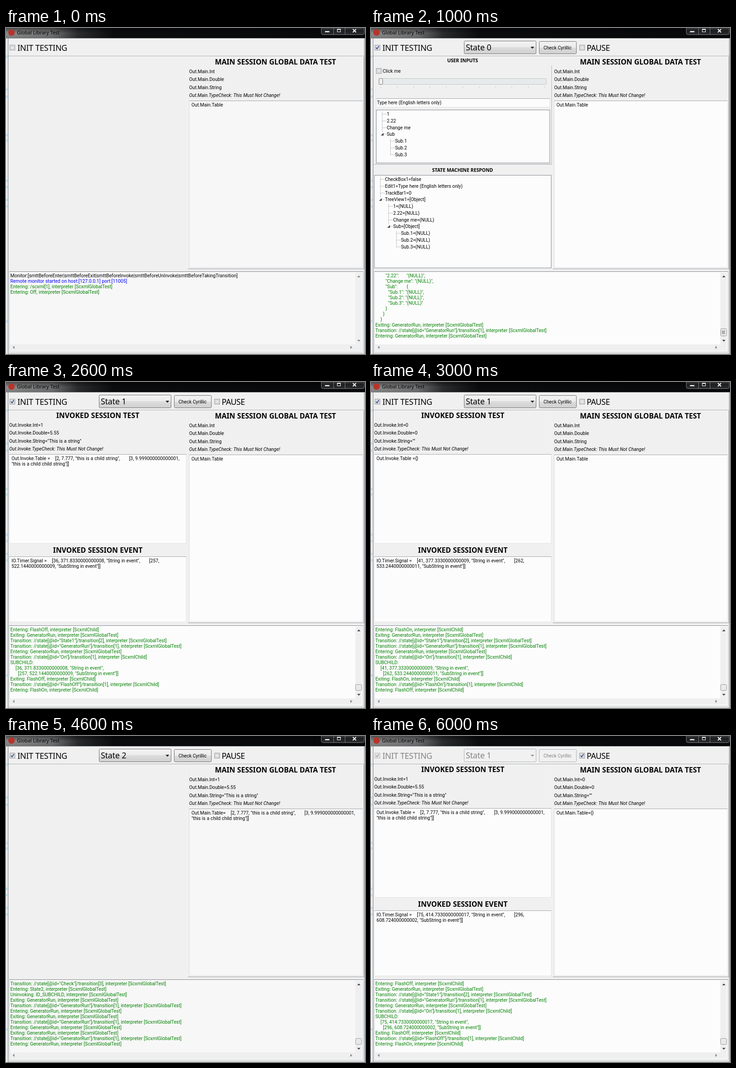
Write an HTML page that moves like this. It is 784x714 px and loops after 7000 ms.

```html
<!DOCTYPE html>
<html lang="en">
<head>
<meta charset="utf-8">
<title>Global Library Test</title>
<style>
html, body { margin: 0; width: 100%; height: 100%; overflow: hidden; background: #f0f0f0; }
svg { display: block; width: 784px; height: 714px; }
text { white-space: pre; font: 10.25px Roboto, sans-serif; word-spacing: .25px; }
.h1 { font: bold 15.6px "Noto Sans", sans-serif; text-anchor: middle; }
.h2 { font: bold 10.3px "Noto Sans", sans-serif; text-anchor: middle; }
.big { font: 17.6px "Noto Sans", sans-serif; letter-spacing: -.2px; }
.ui { font: 10.6px "Noto Sans", sans-serif; }
.it { font-style: italic; }
.mid { text-anchor: middle; }
</style>
</head>
<body>
<svg id="stage" viewBox="0 0 784 714">
<defs>
  <linearGradient id="bar"><stop offset="0" stop-color="#8b8b8b"/><stop offset=".13" stop-color="#6f7072"/><stop offset=".2" stop-color="#2b2c2e"/><stop offset=".3" stop-color="#0b0c0e"/><stop offset="1" stop-color="#08090b"/></linearGradient>
  <linearGradient id="shade" x2="0" y2="1"><stop offset="0" stop-color="#000" stop-opacity=".45"/><stop offset=".5" stop-color="#000" stop-opacity="0"/><stop offset="1" stop-color="#000" stop-opacity=".1"/></linearGradient>
  <linearGradient id="btn" x2="0" y2="1"><stop offset="0" stop-color="#f3f3f3"/><stop offset=".5" stop-color="#ebebeb"/><stop offset=".5" stop-color="#dddddd"/><stop offset="1" stop-color="#cfcfcf"/></linearGradient>
  <linearGradient id="glass"><stop offset="0" stop-color="#f2f4f5"/><stop offset=".5" stop-color="#e4f3f5"/><stop offset="1" stop-color="#f6f7f7"/></linearGradient>
  <linearGradient id="cap" x2="0" y2="1"><stop offset="0" stop-color="#4a4b4d"/><stop offset=".5" stop-color="#1d1e20"/><stop offset="1" stop-color="#2c2d2f"/></linearGradient>
</defs>
</svg>
<script>
const NS = 'http://www.w3.org/2000/svg';
const stage = document.getElementById('stage');
const INK = '#000', GREEN = '#008000', BLUE = '#0000ff', DIM = '#838383';
let layer = stage;

function add(tag, attrs, body) {
  const el = document.createElementNS(NS, tag);
  for (const k in attrs) el.setAttribute(k, attrs[k]);
  if (body !== undefined) el.textContent = body;
  return layer.appendChild(el);
}
const text = (x, y, s, cls = '', fill = INK) => add('text', { x, y, class: cls, fill }, s);
const rect = (x, y, width, height, fill) => add('rect', { x, y, width, height, fill });
// Pixel-aligned outlined box
const box = (x, y, w, h, fill, stroke, rx = 0) =>
  add('rect', { x: x + .5, y: y + .5, width: w - 1, height: h - 1, fill, stroke, rx });
const path = (d, fill, stroke = 'none', w = 1) => add('path', { d, fill, stroke, 'stroke-width': w });
const dots = (x1, y1, x2, y2) =>
  add('line', { x1, y1, x2, y2, stroke: '#8c8c8c', 'stroke-dasharray': '1 1' });

function panel(x, y, w, h, fill) {
  box(x, y, w, h, fill, '#e2e3e6');
  rect(x, y, w, 1, '#a2a5aa');
}

function checkbox(x, y, on, dim) {
  box(x, y, 12, 12, '#f4f4f4', dim ? '#b1b1b1' : '#8e8f8f');
  box(x + 2, y + 2, 8, 8, '#e6e8ea', dim ? '#dcdcdc' : '#c0c4c8');
  if (on) path(`M${x + 3} ${y + 5.5}l2.2 3.2 4-6.2`, 'none', dim ? '#a5a5a5' : '#33488c', 1.7);
}

function frame() {
  rect(0, 0, 784, 714, '#f0f0f0');
  rect(0, 0, 784, 23, 'url(#bar)');
  rect(0, 0, 784, 23, 'url(#shade)');
  add('circle', { cx: 12, cy: 10, r: 7, fill: '#b8342a' });
  text(24, 14, 'Global Library Test', 'ui');
  box(688, -4, 95, 19, 'url(#cap)', '#7c7d80', 4);
  rect(715, 0, 1, 14, '#7c7d80');
  rect(740, 0, 1, 14, '#7c7d80');
  box(696, 6, 11, 4, '#fff', '#555');
  box(723, 3, 8, 6, 'none', '#fff');
  rect(723, 2, 8, 2, '#fff');
  path('M757.5 2.5l7 7m0-7l-7 7', 'none', '#fff', 2);
  rect(0, 22, 784, 1, '#8f9294');
  rect(0, 23, 4, 691, '#eef2f4');
  for (const y of [60, 132, 148, 232, 244, 332, 346, 374, 388, 640]) rect(0, y, 3, 5, '#bfe3f2');
  rect(4, 23, 1, 691, '#6d7073');
  rect(782, 23, 1, 691, '#7a7d80');
  rect(783, 23, 1, 691, '#e4e8ea');
  rect(5, 61, 777, 1, '#a3a3a3');
  rect(5, 62, 777, 1, '#fff');
  rect(5, 712, 777, 1, '#b4b6b8');
}

function toolbar({ state, pause, focus }) {
  const on = state !== undefined, ink = pause ? DIM : INK;
  checkbox(8, 37, on, pause);
  text(25, 50, 'INIT TESTING', 'big', ink);
  if (!on) return;
  const edge = pause ? '#adb2b5' : '#707070', face = pause ? '#f1f1f1' : 'url(#btn)';
  box(203, 28, 158, 29, face, edge, 2);
  text(207, 49, 'State ' + state, 'big', ink);
  path('M348.5 41h8l-4 4.5z', pause ? '#9a9a9a' : '#222');
  box(367, 29, 82, 28, face, focus ? '#3c7fb1' : edge, 2);
  if (focus) box(368, 30, 80, 26, 'none', '#5fcbf0', 1);
  text(407.5, 47, 'Check Cyrillic', 'mid', ink);
  checkbox(455, 37, pause);
  text(471, 50, 'PAUSE', 'big').style.letterSpacing = '-.6px';
}

function mainSession({ paper, main = ['', '', '', ['']] }) {
  const [int, dbl, str, table] = main;
  rect(396, 63, 1, 465, '#fafafa');
  rect(397, 63, 1, 465, '#e4e4e4');
  rect(397, 527, 385, 1, '#9c9c9c');
  rect(781, 63, 1, 465, '#a8a8a8');
  text(588.5, 80, 'MAIN SESSION GLOBAL DATA TEST', 'h1');
  text(400, 99, 'Out.Main.Int' + int);
  text(400, 116, 'Out.Main.Double' + dbl);
  text(400, 134, 'Out.Main.String' + str);
  text(400, 151, 'Out.Main.TypeCheck: This Must Not Change!', 'it');
  panel(400, 159, 379, 366, paper);
  text(405, 172, 'Out.Main.Table' + table[0]);
  if (table[1]) text(405, 184, table[1]);
}

function invoked({ paper, invoke: [int, dbl, str, table], event }) {
  text(200.5, 79, 'INVOKED SESSION TEST', 'h1');
  text(7, 98, 'Out.Invoke.Int=' + int);
  text(7, 115, 'Out.Invoke.Double=' + dbl);
  text(7, 133, `Out.Invoke.String="${str}"`);
  text(7, 150, 'Out.Invoke.TypeCheck: This Must Not Change!', 'it');
  panel(7, 158, 387, 196, paper);
  text(12, 171, 'Out.Invoke.Table =' + table[0]);
  if (table[1]) text(12, 183, table[1]);
  text(200.5, 374, 'INVOKED SESSION EVENT', 'h1');
  panel(7, 382, 387, 144, paper);
  const [a, b, c, d] = event;
  text(12, 395, `IO.Timer.Signal =    [${a}, ${b}, "String in event",       [${c},`);
  text(12, 407, `${d}, "SubString in event"]]`);
}

// Rows are [depth, label]; a parent row is one followed by a deeper row
function tree(x, y, rows) {
  const pitch = 14.75, step = 17.5, row = i => Math.round(y + i * pitch) + .5;
  rows.forEach(([depth, label], i) => {
    const lx = Math.round(x + depth * step) + .5, cy = row(i);
    let first = i;
    while (first && rows[first - 1][0] >= depth) first--;
    if (!rows.slice(i + 1).some(r => r[0] === depth)) dots(lx, row(first) - 5, lx, cy);
    dots(lx, cy, lx + 9, cy);
    if (rows[i + 1] && rows[i + 1][0] > depth) {
      rect(lx - 3, cy - 4, 7, 8, '#fcfcfc');
      path(`M${lx + 3} ${cy - 3}v6h-6z`, '#404040');
    }
    text(lx + 10, cy + 3.5, label);
  });
}

function inputs({ paper }) {
  text(200, 75, 'USER INPUTS', 'h2');
  rect(394, 82, 1, 217, '#b4b4b4');
  rect(7, 298, 388, 1, '#a0a0a0');
  checkbox(11, 88, false);
  text(25.5, 98, 'Click me');
  box(17, 110, 366, 14, '#e7eaea', '#c4c8c8');
  box(17, 110, 9, 14, '#f0f0f0', '#777', 2);
  for (let i = 0; i <= 10; i++) rect(Math.round(21 + i * 35.8), 128, 1, 3, '#c4c4c4');
  panel(11, 154, 380, 20, paper);
  text(13, 167, 'Type here (English letters only)');
  box(11, 179, 380, 117, paper, '#828790');
  const leaves = ['1', '2.22', 'Change me'], subs = ['Sub.1', 'Sub.2', 'Sub.3'];
  tree(24, 188, [...leaves.map(s => [0, s]), [0, 'Sub'], ...subs.map(s => [1, s])]);
  text(200, 315, 'STATE MACHINE RESPOND', 'h2');
  box(7, 322, 387, 204, paper, '#828790');
  const nil = depth => s => [depth, s + '=(NULL)'];
  tree(20, 331, [
    [0, 'CheckBox1=false'], [0, 'Edit1=Type here (English letters only)'], [0, 'TrackBar1=0'],
    [0, 'TreeView1=[Object]'], ...leaves.map(nil(1)), [1, 'Sub=[Object]'], ...subs.map(nil(2))
  ]);
}

function logView({ paper, log, thumb = 662 }) {
  box(7, 533, 773, 177, paper, '#c9ccd1');
  rect(7, 533, 773, 1, '#828790');
  rect(763, 536, 14, 157, '#efefef');
  rect(9, 693, 768, 14, '#efefef');
  const live = log.length > 4, ink = live ? '#444' : '#8a8a8a';
  path('M767 546h7l-3.5-4z', ink);
  path('M767 683h7l-3.5 4z', ink);
  path('M18.5 696v7l-4-3.5z', '#8a8a8a');
  path('M752 696v7l4-3.5z', '#8a8a8a');
  if (live) {
    box(763, thumb, 14, thumb < 660 ? 17 : 14, '#e9e9e9', '#979797', 2);
    if (thumb < 660) for (let i = 0; i < 4; i++) rect(766, thumb + 5 + i * 2, 7, 1, '#777');
  }
  log.forEach((line, i) => {
    const [s, fill] = [].concat(line);
    text(9.5, 546 + i * 12, s, '', fill || GREEN);
  });
}

function dialog() {
  box(187, 275, 348, 143, 'url(#glass)', '#62686c', 5);
  box(188, 276, 346, 141, 'none', '#fbfdfd', 4);
  text(194, 293, 'Globaltestlibrary', 'ui');
  path('M484.5 276v14q0 3.500 3.500 3.500h36q3.500 0 3.500-3.500v-14', '#f1f4f5', '#9ba1a5');
  path('M503.500 281.500l7 6.500m0-6.500l-7 6.500', 'none', '#555b60', 3.4);
  path('M503.500 281.500l7 6.500m0-6.500l-7 6.500', 'none', '#fff', 1.4);
  box(193, 302, 335, 109, '#fcfcfc', '#8a9094');
  rect(194, 373, 333, 37, '#f0f0f0');
  rect(194, 373, 333, 1, '#dfdfdf');
  text(203.5, 328, 'Cyrillic test SUCCEEDED!', 'ui').style.letterSpacing = '-.15px';
  text(203.5, 356, "P.S. Check also that modal window doesn't affect state machine!", 'ui').style.letterSpacing = '-.15px';
  box(456, 381, 61, 20, 'url(#btn)', '#3c7fb1', 2);
  box(457, 382, 59, 18, 'none', '#5fcbf0', 1);
  text(486.5, 395, 'OK', 'ui mid');
}

const G = 'ScxmlGlobalTest', C = 'ScxmlChild';
const by = who => `, interpreter [${who}]`;
const enter = (s, who = G) => `Entering: ${s}${by(who)}`;
const exit = (s, who = G) => `Exiting: ${s}${by(who)}`;
const move = (id, n, who = G, kind = 'state') =>
  `Transition: //${kind}[@id="${id}"]/transition[${n}]${by(who)}`;
const step = move('GeneratorRun', 1);
const cycle = [exit('GeneratorRun'), step, enter('GeneratorRun')];

function childLog(from, to, [a, b, c, d]) {
  return [
    enter(from, C), exit('GeneratorRun'), move('State1', 2), step, enter('GeneratorRun'),
    `Transition: //state[@id="On"]/transition[1]${by(C)}`, 'SUBCHILD:',
    `    [${a}, ${b}, "String in event",`, `      [${c}, ${d}, "SubString in event"]]`,
    exit(from, C), move(from, 1, C), enter(to, C)
  ];
}

const nested = ['    [2, 7.777, "this is a child string",       [3, 9.999000000000001,', '"this is a child child string"]]'];
const full = [1, 5.55, 'This is a string', nested], empty = [0, 0, '', ['{}']];
const mainFull = ['=1', '=5.55', '="This is a string"', ['=' + nested[0], nested[1]]];
const mainEmpty = ['=0', '=0', '=""', ['={}']];
const ev1 = [36, '371.8330000000008', 257, '522.1440000000009'];
const ev2 = [41, '377.3330000000009', 262, '533.2440000000011'];
const ev3 = [75, '414.7330000000017', 296, '608.724000000002'];
const WHITE = '#fcfcfc', PALE = '#f7f7f7';

const scenes = [
  { paper: PALE, log: [
    ['Monitor:[smttBeforeEnter|smttBeforeExit|smttBeforeInvoke|smttBeforeUnInvoke|smttBeforeTakingTransition]', INK],
    ['Remote monitor started on host:[127.0.0.1] port:[11005]', BLUE],
    enter('/scxml[1]'), enter('Off')] },
  { paper: WHITE, state: 0, left: inputs, thumb: 658, log: [
    '        "2.22":      "(NULL)",', '        "Change me": "(NULL)",', '        "Sub":       {',
    ...[1, 2, 3].map(n => `          "Sub.${n}": "(NULL)"${n < 3 ? ',' : ''}`),
    '        }', '      }', '    }', ...cycle] },
  { paper: WHITE, state: 1, left: invoked, invoke: full, event: ev1, log: childLog('FlashOff', 'FlashOn', ev1) },
  { paper: WHITE, state: 1, left: invoked, invoke: empty, event: ev2, log: childLog('FlashOn', 'FlashOff', ev2) },
  { paper: PALE, state: 2, main: mainFull, log: [
    move('Check', 3), enter('State2'), `Uninvoking: ID_SUBCHILD${by(G)}`, ...cycle, ...cycle, ...cycle] },
  { paper: PALE, state: 2, main: mainFull, focus: true, over: dialog, log: [
    ...cycle, ...cycle, ...cycle, move('On', 2, G, 'parallel'),
    'INFO: "Проверка кириллицы пройдена успешно!"', 'INFO: "CYRILLIC CHECK SUCCESS!"'] },
  { paper: WHITE, state: 1, pause: true, left: invoked, invoke: full, event: ev3, main: mainEmpty,
    log: childLog('FlashOff', 'FlashOn', ev3) }
];

frame();
const views = scenes.map(scene => {
  layer = stage;
  layer = add('g', { visibility: 'hidden' });
  toolbar(scene);
  if (scene.left) scene.left(scene);
  mainSession(scene);
  logView(scene);
  if (scene.over) scene.over();
  return layer;
});

const HOLD = 1000;
function draw() {
  const now = Math.floor(performance.now() / HOLD) % views.length;
  views.forEach((v, i) => v.setAttribute('visibility', i === now ? 'visible' : 'hidden'));
  requestAnimationFrame(draw);
}
draw();
</script>
</body>
</html>
```
